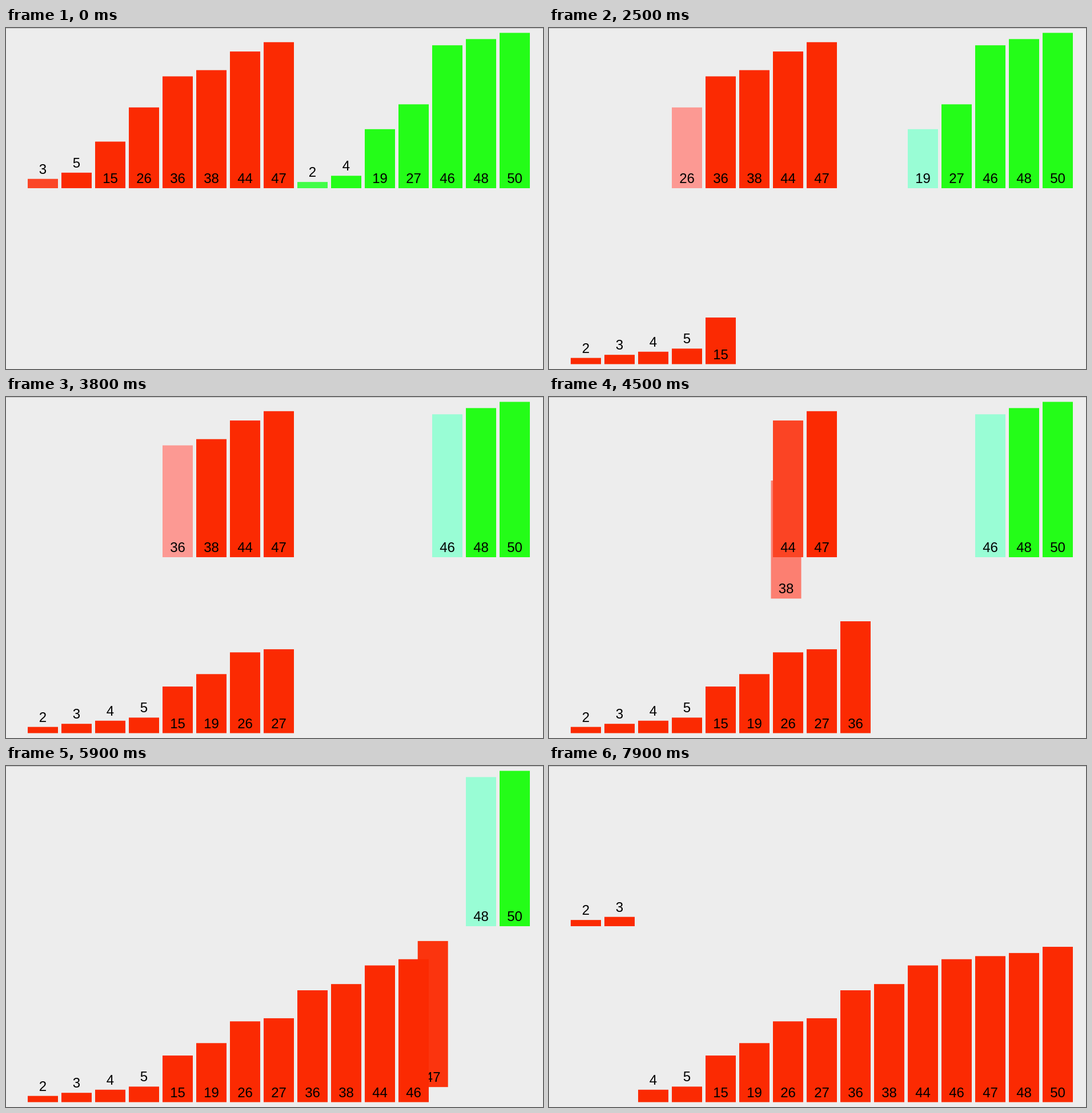
These frames come from a looping animation (940 by 596 pixels, 8000 ms). An HTML page with a canvas:

```html
<!DOCTYPE html>
<html lang="en">
<head>
<meta charset="utf-8">
<title>Merge sort</title>
<style>
  html, body { margin: 0; height: 100%; overflow: hidden; background: #ededed; }
  canvas { display: block; }
</style>
</head>
<body>
<canvas id="stage" width="940" height="596"></canvas>
<script>
const ctx = document.getElementById('stage').getContext('2d');
const LOOP = 8000, TICK = 100, MOVE = 180;
const TOP = 280, BOTTOM = 587.5, UNIT = 5.43, BAR = 53, PITCH = 59, LEFT = 38;
const RED = [251, 42, 2], GREEN = [36, 253, 24];
const PALE_RED = [252, 153, 147], PALE_GREEN = [153, 253, 213];

const runs = [[3, 5, 15, 26, 36, 38, 44, 47], [2, 4, 19, 27, 46, 48, 50]];
const values = runs.flat();
const merged = [...values].sort((a, b) => a - b);

// Start of each merge step, then of the moves back to the upper row.
const FIRST_PICK = -72;
const mergeStarts = [520, 920, 1324, 1740, 2230, 2630, 3050, 3470, 4020, 4430, 4870, 5330, 5770, 6320, 6632];
const returnStarts = [7150, 7570];
const heldTicks = [1, 28, 55, 68];

const mix = (a, b, p) => a + (b - a) * p;
const mixColor = (a, b, p) => a.map((c, i) => mix(c, b[i], p));
const slotX = slot => LEFT + PITCH * slot;

function progress(start, time) {
  const t = Math.min(1, Math.max(0, (time - start) / MOVE));
  return t < 0.5 ? 4 * t ** 3 : 1 - 4 * (1 - t) ** 3;
}

const bars = values.map((value, slot) => {
  const green = slot >= runs[0].length;
  const run = runs[+green];
  const previous = run[run.indexOf(value) - 1];
  const rank = merged.indexOf(value);
  return {
    value, slot, rank,
    color: green ? GREEN : RED,
    pale: green ? PALE_GREEN : PALE_RED,
    pickStart: previous ? mergeStarts[merged.indexOf(previous)] : FIRST_PICK,
    mergeStart: mergeStarts[rank],
    returnStart: returnStarts[rank] ?? Infinity
  };
});

function drawBar(bar, time) {
  const merge = progress(bar.mergeStart, time);
  const back = progress(bar.returnStart, time);
  const picked = mixColor(bar.color, bar.pale, progress(bar.pickStart, time));
  const x = mix(slotX(bar.slot), slotX(bar.rank), merge);
  const base = mix(mix(TOP, BOTTOM, merge), TOP, back);
  const height = bar.value * UNIT;

  ctx.fillStyle = `rgb(${mixColor(picked, RED, merge).map(Math.round)})`;
  ctx.fillRect(x, base - height, BAR, height);
  ctx.fillStyle = '#000';
  ctx.fillText(bar.value, x + BAR / 2, (bar.value < 10 ? base - height : base) - 9);
}

function draw(now) {
  let tick = Math.floor((now % LOOP) / TICK);
  if (heldTicks.includes(tick)) tick--;

  ctx.fillStyle = '#ededed';
  ctx.fillRect(0, 0, 940, 596);
  ctx.fillStyle = '#bdbdbd';
  ctx.fillRect(0, 0, 940, 1);
  ctx.font = '24px "Liberation Sans", Arial, sans-serif';
  ctx.textAlign = 'center';
  bars.forEach(bar => drawBar(bar, tick * TICK));
}

const origin = performance.now();
function frame() {
  draw(performance.now() - origin);
  requestAnimationFrame(frame);
}
frame();
</script>
</body>
</html>
```
